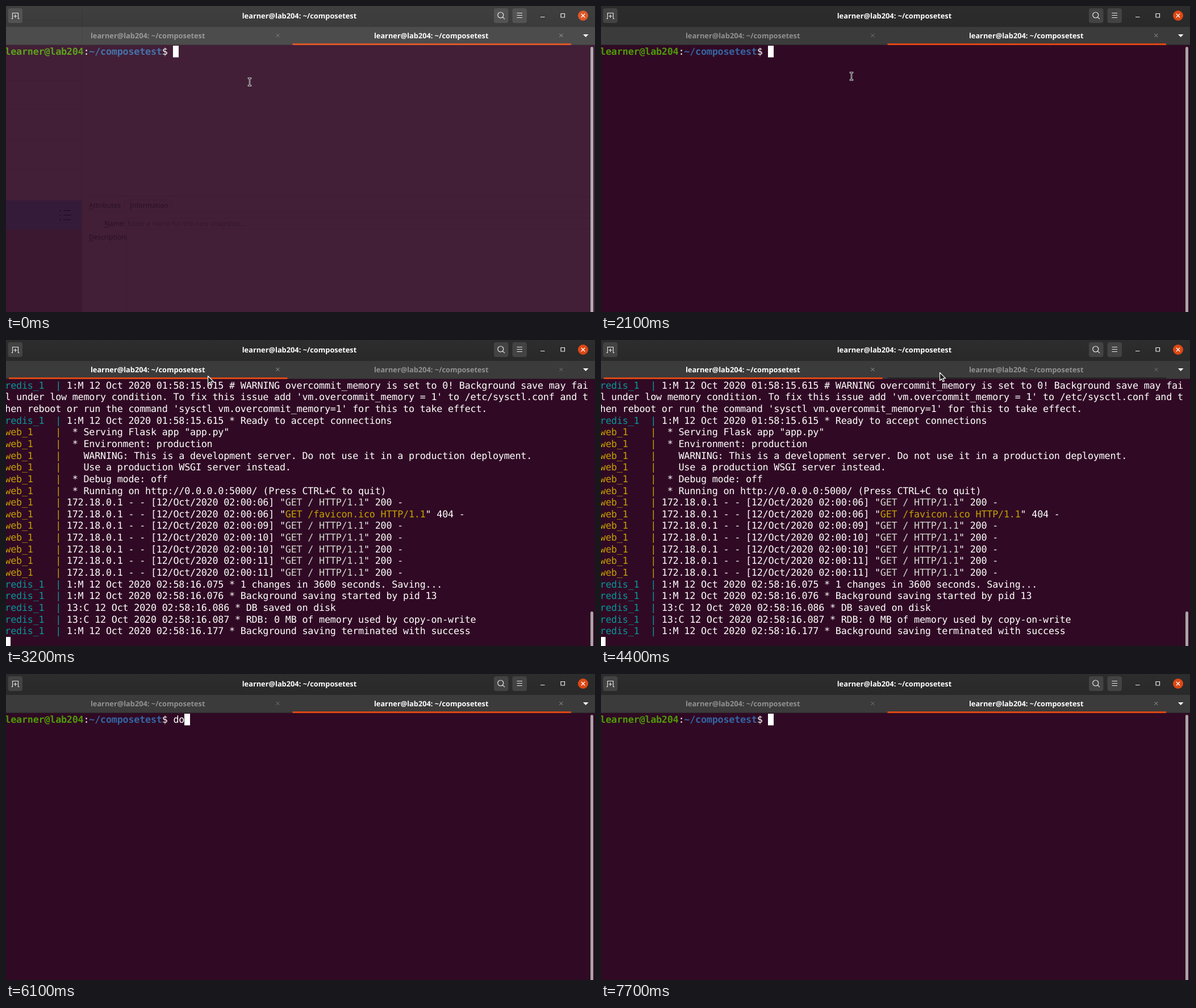
These frames come from a looping animation (1037 by 540 pixels, 8 s). An HTML page with a canvas:

```html
<!DOCTYPE html>
<html lang="en">
<head>
<meta charset="utf-8">
<title>Terminal</title>
<style>
html, body { margin: 0; height: 100%; overflow: hidden; background: #300a24; }
canvas { display: block; }
</style>
</head>
<body>
<canvas id="stage" width="1037" height="540"></canvas>
<script>
const ctx = document.getElementById('stage').getContext('2d');
ctx.textRendering = 'geometricPrecision';

const LOOP = 8000, CELL_W = 9.87, CELL_H = 20.64, LEFT = -1.7, TOP = 70;
const MONO = '16.8px "DejaVu Sans Mono", monospace';
const UI = '"Noto Sans", "Open Sans", sans-serif', UI_BOLD = `bold 12.8px ${UI}`;
const WHITE = '#fff', SILVER = '#d3d7cf', GREEN = '#4e9a06', BLUE = '#3465a4',
      CYAN = '#06989a', YELLOW = '#c4a000', ORANGE = '#dd4814', DIM = '#919191';
const USER = 'learner@lab204', PATH = '~/composetest', TITLE = USER + ': ' + PATH;

const redis = text => [['redis_1  | ', CYAN], [text, WHITE]];
const web = text => [['web_1    | ', YELLOW], [text, WHITE]];
const get = (time, path = '/', color = SILVER, status = 200) => [
  ...web(`172.18.0.1 - - [12/Oct/2020 02:00:${time}] "`),
  [`GET ${path} HTTP/1.1`, color], [`" ${status} -`, WHITE]];
const LOG = [
  redis('1:M 12 Oct 2020 01:58:15.615 # WARNING overcommit_memory is set to 0! Background save may fai'),
  [["l under low memory condition. To fix this issue add 'vm.overcommit_memory = 1' to /etc/sysctl.conf and t", WHITE]],
  [["hen reboot or run the command 'sysctl vm.overcommit_memory=1' for this to take effect.", WHITE]],
  redis('1:M 12 Oct 2020 01:58:15.615 * Ready to accept connections'),
  web(' * Serving Flask app "app.py"'),
  web(' * Environment: production'),
  web('   WARNING: This is a development server. Do not use it in a production deployment.'),
  web('   Use a production WSGI server instead.'),
  web(' * Debug mode: off'),
  web(' * Running on http://0.0.0.0:5000/ (Press CTRL+C to quit)'),
  get('06'), get('06', '/favicon.ico', YELLOW, 404),
  ...['09', '10', '10', '11', '11'].map(s => get(s)),
  redis('1:M 12 Oct 2020 02:58:16.075 * 1 changes in 3600 seconds. Saving...'),
  redis('1:M 12 Oct 2020 02:58:16.076 * Background saving started by pid 13'),
  redis('13:C 12 Oct 2020 02:58:16.086 * DB saved on disk'),
  redis('13:C 12 Oct 2020 02:58:16.087 * RDB: 0 MB of memory used by copy-on-write'),
  redis('1:M 12 Oct 2020 02:58:16.177 * Background saving terminated with success'),
];
const PROMPT = [[USER, GREEN, true], [':', WHITE], [PATH, BLUE, true], ['$ ', WHITE]];

// [start, value...]: the last entry already begun applies
const TYPED = [[0, ''], [5900, 'd'], [6100, 'do'], [6300, 'doc'], [6400, 'dock'],
  [6500, 'docke'], [6700, 'docker'], [7200, 'docke'], [7600, 'do'], [7700, '']];
const BLOCK = [[0, true], [200, false], [800, true], [3800, false], [4400, true],
  [5300, false], [5900, true]];
const POINTER = [[0, 'beam', 429, 134], [2100, 'beam', 441, 124], [2200, 'beam', 428, 108],
  [2300, 'beam', 392, 86], [2400, 'beam', 364, 73], [2800, 'arrow', 355, 63],
  [4000, 'arrow', 368, 63], [4100, 'arrow', 415, 62], [4200, 'arrow', 478, 60],
  [4300, 'arrow', 545, 58], [4400, 'arrow', 596, 57], [4500, 'arrow', 616, 57],
  [5000, 'beam', 600, 102], [5100, 'beam', 559, 158], [5800, 'none', 0, 0]];
const at = (list, t) => list.findLast(e => e[0] <= t);

function rect(x, y, w, h, color) {
  ctx.fillStyle = color;
  ctx.fillRect(x, y, w, h);
}

function round(x, y, w, h, r, fill) {
  ctx.beginPath();
  ctx.roundRect(x, y, w, h, r);
  ctx.fillStyle = fill;
  ctx.fill();
}

function line(path, color, width = 1) {
  ctx.strokeStyle = color;
  ctx.lineWidth = width;
  ctx.stroke(new Path2D(path));
}

function label(text, x, y, color, font, align = 'left') {
  ctx.font = font;
  ctx.fillStyle = color;
  ctx.textAlign = align;
  ctx.fillText(text, x, y);
}

function row(runs, index) {
  let col = 0;
  for (const [text, color, bold] of runs)
    for (const ch of text)
      label(ch, LEFT + CELL_W * col++, TOP + CELL_H * index + 15.8, color, (bold ? 'bold ' : '') + MONO);
}

function block(col, index) {
  rect(Math.round(LEFT + CELL_W * col), Math.round(TOP + CELL_H * index), 10, 20.6, WHITE);
}

function header() {
  const shade = ctx.createLinearGradient(0, 0, 0, 36);
  shade.addColorStop(0, '#2d2d2d');
  shade.addColorStop(1, '#292929');
  rect(0, 0, 1037, 36, shade);
  label(TITLE, 516.5, 21.5, WHITE, UI_BOLD, 'center');
  for (const x of [3.5, 859, 891.5]) round(x, 4, 25.5, 26, 4, '#434343');
  line('M9.5 22.5H11.5V12.5H21.5V22.5H23.5M16.5 15V21M13.5 18H19.5', '#e8e8e8', 1.1);
  line('M875.8 16a5 5 0 1 1-10 0a5 5 0 1 1 10 0M874.5 19.7L878 23.2', '#e8e8e8', 1.2);
  line('M899.5 12.5H909M899.5 16.5H909M899.5 20.5H909', '#e8e8e8', 1.2);
  line('M941 19.5H948.5M977 13.5H983.5V20H977Z', '#eee', 1.2);
  round(1007, 8, 18, 18, 9, ORANGE);
  line('M1012.8 13.8L1019.2 20.2M1019.2 13.8L1012.8 20.2', WHITE, 1.3);
}

function tabs(active, hover) {
  rect(0, 36, 1037, 33, '#3b3b3b');
  rect(0, 36, 1037, 1, '#2a2a2a');
  rect(0, 68, 1037, 1, '#2d2a2c');
  [[5, 249.7], [504.5, 748.7]].forEach(([x, mid], i) => {
    const on = i === active;
    if (on || i === hover) rect(x, 66, 490.5, 3, on ? ORANGE : '#252525');
    label(TITLE, mid, 56.5, on ? WHITE : DIM, UI_BOLD, 'center');
    const cx = mid + 228.7;
    line(`M${cx - 3} 49l6 6m0-6l-6 6`, on ? '#9a9a9a' : '#777');
  });
  ctx.fillStyle = WHITE;
  ctx.fill(new Path2D('M1016 50H1025.5L1020.7 55Z'));
}

// Another window fading away over the terminal
function ghost() {
  rect(0, 0, 1037, 540, 'rgba(245,245,240,.09)');
  const edge = 'rgba(30,5,25,.1)', ink = 'rgba(20,0,18,.5)';
  for (const y of [24, 131, 182, 236, 289]) rect(0, y, 134, 1, edge);
  rect(133, 0, 1, 540, edge);
  rect(0, 343, 133, 52, '#351b3a');
  rect(0, 395, 133, 145, 'rgba(48,10,36,.35)');
  line('M94 361h3m4 0h13M94 369h3m4 0h13M94 377h3m4 0h13', ink, 1.5);
  rect(134, 336, 896, 1, edge);
  rect(134, 362, 896, 1, edge);
  line('M208.5 362V342.5H291.5V362M211.5 374.5H1030M211.5 393.5H1030M211.5 374V394M211.5 400V540', edge);
  const font = `12px ${UI}`;
  [['Attributes', 146, 356], ['Information', 218, 356], ['Name:', 173, 388], ['Description:', 146, 412]]
    .forEach(([text, x, y]) => {
      label(text, x, y, ink, font);
      rect(x, y + 2, ctx.measureText(text[0]).width, 1, ink);
    });
  label('Enter a name for the new snapshot...', 214, 388, 'rgba(20,0,18,.28)', font);
}

function pointer(kind, x, y) {
  if (kind === 'none') return;
  ctx.save();
  ctx.translate(x, y);
  ctx.lineJoin = 'round';
  if (kind === 'beam') {
    const beam = 'M-2 -6.5H2M-2 6.5H2M0 -6.5V6.5';
    ctx.lineCap = 'square';
    line(beam, '#eee', 2.5);
    line(beam, '#222', 1);
  } else {
    const arrow = new Path2D('M.5 .5V14.5L3.8 11.5L6 16.5L8.3 15.5L6.2 10.7H10.6Z');
    ctx.fillStyle = '#1b1b1b';
    ctx.fill(arrow);
    ctx.strokeStyle = WHITE;
    ctx.lineWidth = 1.2;
    ctx.stroke(arrow);
  }
  ctx.restore();
}

function draw(t) {
  const logTab = t >= 3200 && t < 4700;
  const [, kind, px, py] = at(POINTER, t);
  const hover = kind === 'arrow' && t >= 3000 ? (px < 500 ? 0 : 1) : -1;
  const blockOn = at(BLOCK, t)[1];
  rect(0, 0, 1037, 540, '#300a24');
  header();
  tabs(logTab ? 0 : 1, hover);
  if (logTab) {
    LOG.forEach(row);
    if (blockOn) block(0, LOG.length);
    round(1029, 479, 5, 80, 2.5, '#aaa3a6');
  } else {
    const typed = at(TYPED, t)[1];
    row([...PROMPT, [typed, WHITE]], 0);
    if (blockOn) block(30 + typed.length, 0);
    round(1029, 72, 5, 490, 2.5, '#aaa3a6');
  }
  if (t < 200) ghost();
  pointer(kind, px, py);
}

function tick(now) {
  draw(now % LOOP);
  requestAnimationFrame(tick);
}
requestAnimationFrame(tick);
</script>
</body>
</html>
```
